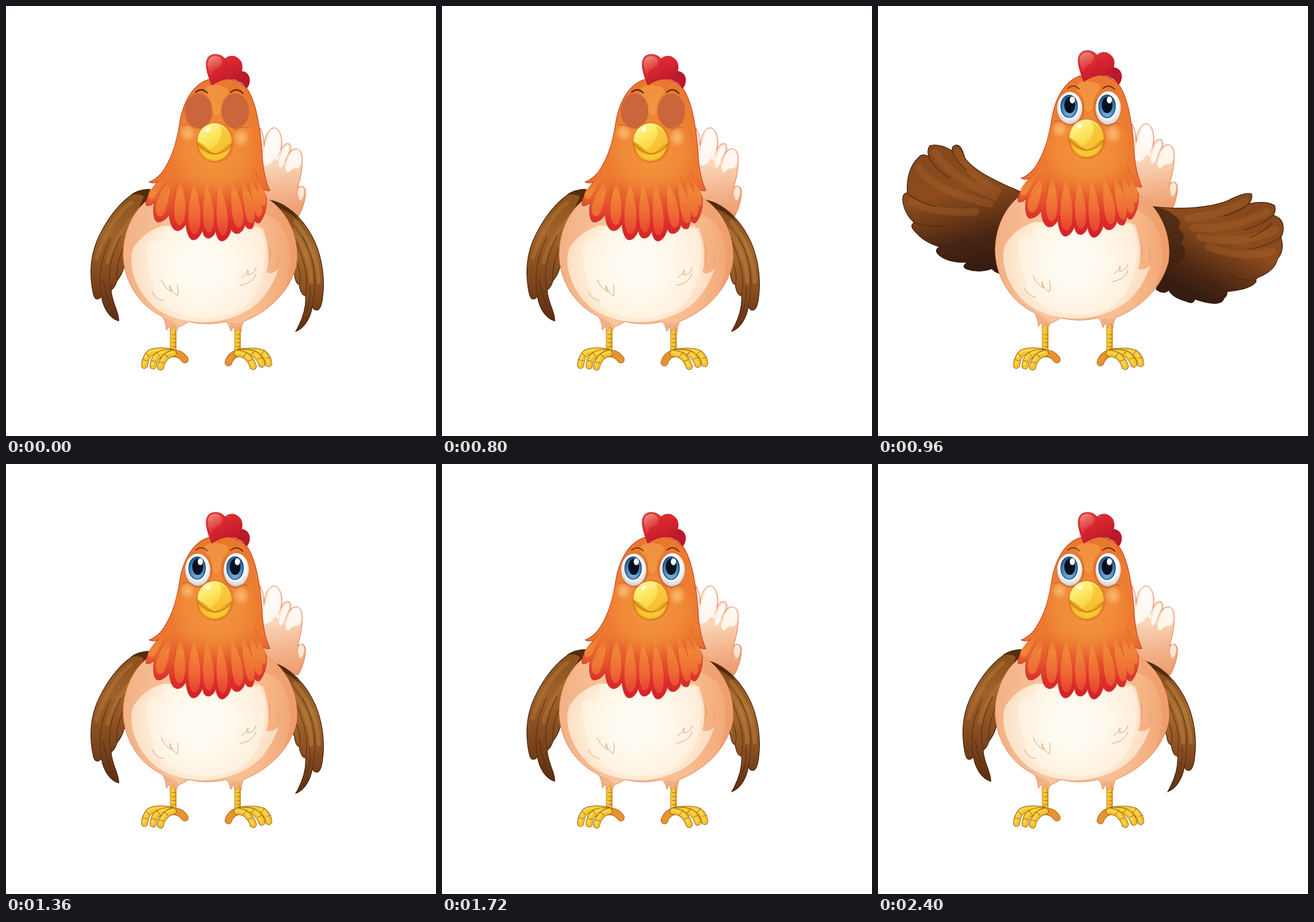
Write an HTML page that moves like this. It is 748 px wide and 748 px high and loops after 3.32 s.

```html
<!DOCTYPE html>
<html>
<head>
<meta charset="utf-8">
<title>Hen</title>
<style>
html, body { margin: 0; width: 100%; height: 100%; overflow: hidden; background: #fff; }
svg { display: block; width: 100vw; height: 100vh; }
.line { fill: none; stroke-linecap: round; stroke-linejoin: round; }
</style>
</head>
<body>
<svg viewBox="0 0 748 748">
<defs>
  <linearGradient id="headFill" gradientUnits="userSpaceOnUse" x1="0" y1="127" x2="0" y2="408">
    <stop offset="0" stop-color="#e9772d"/><stop offset=".25" stop-color="#ed7d31"/>
    <stop offset=".6" stop-color="#ec7a30"/><stop offset=".76" stop-color="#e6582d"/>
    <stop offset=".88" stop-color="#de302c"/><stop offset="1" stop-color="#d51f2b"/>
  </linearGradient>
  <radialGradient id="faceGlow" gradientUnits="userSpaceOnUse" cx="364" cy="255" r="85">
    <stop offset="0" stop-color="#f4963f"/><stop offset=".6" stop-color="#f18f3a" stop-opacity=".75"/>
    <stop offset="1" stop-color="#f08a35" stop-opacity="0"/>
  </radialGradient>
  <linearGradient id="petalFill" gradientUnits="userSpaceOnUse" x1="0" y1="295" x2="0" y2="396">
    <stop offset="0" stop-color="#f29239" stop-opacity="0"/><stop offset=".3" stop-color="#f18a38" stop-opacity=".9"/>
    <stop offset=".65" stop-color="#ee6b34"/><stop offset="1" stop-color="#e8422f"/>
  </linearGradient>
  <linearGradient id="bodyFill" gradientUnits="userSpaceOnUse" x1="203" y1="0" x2="508" y2="0">
    <stop offset="0" stop-color="#f3b084"/><stop offset=".3" stop-color="#f8c59c"/>
    <stop offset=".75" stop-color="#f8bd90"/><stop offset="1" stop-color="#f2a472"/>
  </linearGradient>
  <radialGradient id="bellyFill" gradientUnits="userSpaceOnUse" cx="340" cy="452" r="128">
    <stop offset="0" stop-color="#fffefa"/><stop offset=".35" stop-color="#fffaef"/>
    <stop offset=".7" stop-color="#feedd8"/><stop offset="1" stop-color="#fbdcbf"/>
  </radialGradient>
  <linearGradient id="tailFill" gradientUnits="userSpaceOnUse" x1="470" y1="212" x2="490" y2="367">
    <stop offset="0" stop-color="#fdf0e4"/><stop offset=".4" stop-color="#fad5b8"/>
    <stop offset=".7" stop-color="#f4b68e"/><stop offset="1" stop-color="#ec9a6c"/>
  </linearGradient>
  <linearGradient id="tipFill" gradientUnits="userSpaceOnUse" x1="0" y1="214" x2="0" y2="290">
    <stop offset="0" stop-color="#fffefc"/><stop offset="1" stop-color="#fff4e9"/>
  </linearGradient>
  <linearGradient id="combFill" x1="0" y1="0" x2=".6" y2="1">
    <stop offset="0" stop-color="#e64a44"/><stop offset=".5" stop-color="#d8252e"/>
    <stop offset="1" stop-color="#bb182b"/>
  </linearGradient>
  <linearGradient id="shine" x1="0" y1="0" x2=".3" y2="1">
    <stop offset="0" stop-color="#f2978a"/><stop offset="1" stop-color="#de403c" stop-opacity=".2"/>
  </linearGradient>
  <linearGradient id="foldL" gradientUnits="userSpaceOnUse" x1="195" y1="335" x2="190" y2="540">
    <stop offset="0" stop-color="#8d531c"/><stop offset=".3" stop-color="#a0622a"/>
    <stop offset=".65" stop-color="#834a1e"/><stop offset="1" stop-color="#613012"/>
  </linearGradient>
  <linearGradient id="foldR" gradientUnits="userSpaceOnUse" x1="480" y1="350" x2="525" y2="560">
    <stop offset="0" stop-color="#82491a"/><stop offset=".4" stop-color="#a2682c"/>
    <stop offset=".7" stop-color="#8b5021"/><stop offset="1" stop-color="#613012"/>
  </linearGradient>
  <linearGradient id="openL" gradientUnits="userSpaceOnUse" x1="120" y1="265" x2="172" y2="452">
    <stop offset="0" stop-color="#86481c"/><stop offset=".3" stop-color="#8c4c1d"/>
    <stop offset=".55" stop-color="#6b3817"/><stop offset=".75" stop-color="#4a2513"/><stop offset="1" stop-color="#361c11"/>
  </linearGradient>
  <linearGradient id="openR" gradientUnits="userSpaceOnUse" x1="625" y1="345" x2="545" y2="500">
    <stop offset="0" stop-color="#86481c"/><stop offset=".35" stop-color="#8c4c1d"/>
    <stop offset=".6" stop-color="#693717"/><stop offset=".8" stop-color="#4a2513"/><stop offset="1" stop-color="#361c11"/>
  </linearGradient>
  <linearGradient id="beakFill" x1=".15" y1="0" x2=".8" y2="1">
    <stop offset="0" stop-color="#fff6ab"/><stop offset=".4" stop-color="#fde863"/>
    <stop offset="1" stop-color="#f8c62c"/>
  </linearGradient>
  <radialGradient id="cheek">
    <stop offset="0" stop-color="#f9b873"/><stop offset=".6" stop-color="#f6a658" stop-opacity=".8"/>
    <stop offset="1" stop-color="#f29543" stop-opacity="0"/>
  </radialGradient>
  <radialGradient id="white" cx=".5" cy=".42" r=".6">
    <stop offset=".6" stop-color="#fff"/><stop offset="1" stop-color="#c3ccd6"/>
  </radialGradient>
  <radialGradient id="iris" cx=".5" cy=".75" r=".7">
    <stop offset="0" stop-color="#7cbde6"/><stop offset=".6" stop-color="#3f87be"/>
    <stop offset="1" stop-color="#235a94"/>
  </radialGradient>
  <linearGradient id="legFill" x1="0" y1="0" x2="1" y2="0">
    <stop offset="0" stop-color="#f6c22c"/><stop offset=".5" stop-color="#f9cf39"/><stop offset="1" stop-color="#d9921b"/>
  </linearGradient>
</defs>

<g id="tail">
  <path fill="url(#tailFill)" stroke="#e2724d" stroke-width="1" d="M442 212Q449 224 449 243C450 226 458 211 468 212C478 215 483 235 478 251C480 243 487 237 493 240C498 246 495 254 492 257C500 244 514 246 515 262C516 285 512 300 507 317C510 312 520 311 521 322C521 340 514 358 508 367L470 360L440 340Z"/>
  <g fill="url(#tipFill)">
    <path d="M447 256Q451 246 456 230Q460 213 469 214Q479 222 477 244Q478 262 473 270Q469 262 465 269Q458 280 447 277Z"/>
    <path d="M477 264Q483 243 491 243Q494 251 487 263Q484 277 477 282Q472 274 477 264Z"/>
    <path d="M487 277Q494 249 507 249Q515 255 514 270Q512 284 504 282Q498 281 491 290Q484 286 487 277Z"/>
    <path d="M508 328Q507 316 514 314Q520 317 518 327Q516 338 511 338Z" opacity=".8"/>
  </g>
  <path class="line" stroke="#eb9d79" stroke-width=".9" d="M478 251Q475 258 473 262M492 257Q488 263 486 269M507 317Q503 326 504 332"/>
</g>

<g id="folded">
  <path fill="url(#foldL)" stroke="#3d210e" stroke-width="1.2" d="M251 319C218 317 184 355 162 400C146 433 145 466 151 497Q153 509 158 510Q163 510 166 505C169 525 180 543 196 548C198 535 184 516 183 494Q190 489 193 478Q202 467 205 455L238 400Z"/>
  <path fill="#4e290d" opacity=".9" d="M251 319Q231 317 216 329Q232 325 240 332L231 351L250 341Z"/>
  <path class="line" stroke="#b97c3d" stroke-width="7" opacity=".4" d="M218 342C190 362 167 407 158 438M224 365C200 390 181 422 177 445"/>
  <path class="line" stroke="#4b260f" stroke-width="1.1" opacity=".8" d="M182 403C165 437 160 471 166 505M200 400C184 430 175 462 183 494M208 412C198 434 191 455 193 478M169 475Q172 499 182 520"/>
  <path fill="url(#foldR)" stroke="#3d210e" stroke-width="1.2" d="M453 337C487 340 520 371 538 412C550 440 555 475 551 505Q549 526 542 529Q535 530 533 522C530 542 520 560 504 566C513 550 523 527 521 504Q513 504 510 485Q503 482 502 468L475 400Z"/>
  <path fill="#4e290d" opacity=".9" d="M453 337Q475 338 492 353Q504 363 511 374Q494 360 478 352L485 369L458 349Z"/>
  <path class="line" stroke="#c48a45" stroke-width="7" opacity=".4" d="M503 375C528 405 544 446 544 480M500 390C520 418 530 451 531 480"/>
  <path class="line" stroke="#4b260f" stroke-width="1.1" opacity=".8" d="M515 400C537 437 542 475 533 522M504 410C521 445 527 475 521 504M505 445Q515 467 510 485M528 487Q532 510 522 534"/>
</g>

<g id="spread">
  <path fill="url(#openL)" stroke="#2c170c" stroke-width="1.1" d="M248 323C212 308 166 287 151 264Q145 240 135 242Q128 243 129 252Q108 238 90 243Q85 250 88 262Q77 255 70 264C56 277 49 300 51 325Q42 325 43 339Q46 362 63 377Q53 382 66 394Q80 411 107 419Q96 425 107 434Q123 447 156 446Q143 453 155 458Q176 465 198 457Q204 465 217 466L225 390Z"/>
  <g class="line" stroke="#a8632a" stroke-width="13" opacity=".38">
    <path d="M138 256Q158 294 208 322M100 256Q127 298 203 332M71 282Q98 322 194 344M58 341Q100 362 170 358"/>
  </g>
  <path class="line" stroke="#3b1e0d" stroke-width="1.2" opacity=".75" d="M129 252Q136 271 154 286M88 262Q99 284 125 300M51 325Q68 341 100 349M63 377Q88 386 120 382M107 419Q133 420 157 409M156 446Q178 442 192 432"/>
  <path fill="url(#openR)" stroke="#2c170c" stroke-width="1.1" d="M468 348C520 354 572 353 610 338Q638 323 650 327Q652 337 645 344Q674 338 690 347Q693 356 688 364Q704 369 705 384Q706 394 701 402Q708 425 695 440Q691 458 669 469Q654 474 658 479Q650 493 607 497Q608 504 602 508Q598 526 551 510Q549 520 537 514Q511 507 506 494Q497 503 484 493L490 400Z"/>
  <path fill="#3c1f11" opacity=".65" d="M468 348Q500 350 514 364Q530 371 523 387Q538 399 527 412Q540 428 530 440L500 470L490 400Z"/>
  <g class="line" stroke="#a8632a" stroke-width="13" opacity=".38">
    <path d="M638 340Q593 364 540 369M678 357Q616 390 548 386M692 389Q628 419 560 402M686 427Q633 442 575 419"/>
  </g>
  <path class="line" stroke="#3b1e0d" stroke-width="1.2" opacity=".75" d="M645 344Q626 359 600 366M688 364Q666 382 635 390M701 402Q676 419 645 423M658 479Q632 478 610 468M607 497Q584 492 566 478M551 510Q536 499 526 482M685 378Q668 395 647 403"/>
</g>

<g id="feet" stroke-linecap="round" stroke-linejoin="round"></g>

<g id="trunk">
  <path fill="url(#bodyFill)" stroke="#e28255" stroke-width="1" d="M250 335C219 356 202 398 204 438C207 484 235 523 272 540Q278 548 279 564L284 557L287 566L292 557L296 566L300 558Q307 556 318 549Q350 557 383 549Q389 555 391 566L396 558L400 567L405 558L409 567Q408 557 413 549C455 532 492 500 505 452C512 405 490 356 453 334Z"/>
  <path fill="#e98f5c" opacity=".4" d="M455 337C490 359 510 405 504 452C500 470 492 485 482 498C499 455 498 405 476 378Q465 368 446 360Z"/>
  <path fill="url(#bellyFill)" d="M274 382Q241 391 222 420C210 449 225 500 265 529C302 553 362 558 410 535C446 518 462 490 474 458Q459 469 453 463Q462 429 447 386Z"/>
  <path fill="#fffaf0" opacity=".4" d="M287 383Q270 393 270 411Q246 402 244 421Q245 463 259 484Q254 491 265 511C298 543 351 551 397 534C429 520 446 488 449 449Q457 416 440 382Z"/>
  <path class="line" stroke="#d99a70" stroke-width="1" d="M270 476Q275 490 288 497Q284 491 285 486Q289 499 298 504Q301 495 298 485M255 498Q259 509 274 513M435 455Q432 467 420 468Q422 463 421 459Q417 469 410 472M435 466Q430 482 408 486M457 417Q463 431 457 445M471 428Q477 441 472 454M459 449Q461 452 465 453"/>
  <path fill="#eea177" d="M273 541Q278 550 279 564L284 557L287 566L292 557L296 566L300 558Q294 548 273 541M413 550Q401 553 389 550L391 566L396 558L400 567L405 558L409 567Z" opacity=".5"/>

  <path fill="url(#headFill)" stroke="#c83d2b" stroke-width="1.2" d="M355 127C330 133 309 160 302 204C297 240 287 268 271 290Q261 302 249 306Q257 310 264 306C250 322 242 338 244 347Q251 349 258 341C255 358 257 374 264 376Q275 376 284 363C285 379 290 391 299 391Q307 390 313 379C314 394 319 407 326 407Q335 406 342 390C343 400 347 404 353 404Q361 402 365 391C366 401 370 409 376 409Q387 406 392 388C395 395 400 397 406 395Q414 390 416 379C418 387 422 389 428 387Q432 380 432 372Q436 379 441 377C450 367 454 350 453 334L447 318Q453 323 459 321Q449 300 446 265C443 215 436 165 418 142Q395 120 355 127Z"/>
  <ellipse cx="364" cy="255" rx="72" ry="85" fill="url(#faceGlow)"/>
  <g id="petals" fill="url(#petalFill)"></g>
  <path class="line" stroke="#d64a2a" stroke-width="1" opacity=".65" d="M264 306Q275 296 280 286M287 303Q281 329 258 341M295 315Q296 336 284 363M434 286Q439 307 447 318"/>
  <path fill="#f6a34b" d="M351 139Q365 135 381 141Q392 146 382 157Q374 167 373 184Q366 196 359 184Q360 166 350 157Q340 149 351 139Z" opacity=".6"/>
  <ellipse cx="364" cy="237" rx="33" ry="36" fill="#e5742a" opacity=".6"/>

  <g id="shut" fill="#cb653b">
    <ellipse cx="335" cy="183" rx="24" ry="30.5"/>
    <ellipse cx="399" cy="183" rx="24" ry="30.5"/>
    <path fill="#ee8737" d="M303 206Q320 202 332 215L326 224L305 222ZM397 215Q411 205 424 211L424 221L398 224Z"/>
  </g>
  <g id="open">
    <ellipse cx="335" cy="186" rx="24" ry="29" fill="#d4652a" opacity=".7"/>
    <ellipse cx="399" cy="186" rx="24" ry="30" fill="#d4652a" opacity=".7"/>
    <ellipse cx="333.5" cy="184" rx="22" ry="28" fill="url(#white)"/>
    <ellipse cx="400.5" cy="184" rx="22" ry="29" fill="url(#white)"/>
    <g stroke="#17365b" stroke-width="1.2" fill="url(#iris)">
      <ellipse cx="332.5" cy="181" rx="14.5" ry="19.5"/>
      <ellipse cx="398.5" cy="181" rx="14.5" ry="20"/>
    </g>
    <ellipse cx="333.5" cy="179" rx="9.5" ry="14" fill="#07101d"/>
    <ellipse cx="398.5" cy="179" rx="9.5" ry="14" fill="#07101d"/>
    <g fill="#fff">
      <ellipse cx="338" cy="170" rx="4.500" ry="6"/><ellipse cx="402.500" cy="170" rx="4.500" ry="6"/>
    </g>
  </g>
  <ellipse cx="316" cy="221" rx="15" ry="16" fill="url(#cheek)"/>
  <ellipse cx="409" cy="229" rx="16" ry="18" fill="url(#cheek)"/>
  <path class="line" stroke="#cf5d2a" stroke-width="1.2" d="M306 208Q315 203 326 211M398 216Q410 208 422 212"/>
  <path id="brows" class="line" stroke="#4a2510" d="M330 150Q340 141 350 151M391 150Q402 141 412 152"/>

  <path fill="#f0a822" stroke="#c9711a" stroke-width="1" d="M333 235Q334 268 362 271Q390 269 393 237Z"/>
  <path fill="#f8c735" d="M338 250Q362 268 389 249Q382 267 363 268Q345 267 338 250Z"/>
  <path fill="url(#beakFill)" stroke="#d8921d" stroke-width=".9" d="M333 236C332 220 344 204 363 203.500C382 204 393 222 393 238Q384 242 375 251Q364 262 353 251Q345 242 333 236Z"/>
  <path fill="#f6b92a" opacity=".6" d="M392 237Q384 242 375 251Q364 261 354 251Q371 240 374 226Q376 217 372 208Q391 218 392 237Z"/>
  <path class="line" stroke="#b5661a" stroke-width="1.1" d="M334 240Q348 255 363 257.500Q379 256 392 241"/>
  <ellipse cx="351" cy="215" rx="5" ry="3.500" fill="#fffef0" opacity=".8" transform="rotate(-32 351 215)"/>

  <path fill="#b9192a" d="M407 113Q421 113 424 126Q425 138 418 144Q413 133 401 130Z"/>
  <path fill="url(#combFill)" stroke="#b51c2a" stroke-width=".8" d="M358 138C351 121 346 104 349 95Q352 84 364 84Q375 84 381 92Q388 85 399 88Q411 94 411 106Q411 114 407 118Q417 123 417 137Q390 116 358 138Z"/>
  <path fill="url(#shine)" d="M352 108Q348 89 363 87Q371 87 375 93Q378 104 366 109Q357 113 357 126Z"/>
  <path class="line" stroke="#b61a2a" stroke-width="1.2" d="M381 92Q385 99 381 104M407 118Q401 120 396 119"/>
</g>
</svg>

<script>
const byId = id => document.getElementById(id);
const LOOP = 3320;

// Ruff feathers: root x, root y, tip x, tip y, half width
const petals = [
  [278, 296, 253, 336, 8], [288, 300, 268, 366, 10], [304, 302, 302, 381, 10],
  [327, 306, 328, 397, 11], [349, 308, 353, 394, 10], [371, 308, 377, 399, 10],
  [392, 304, 405, 386, 10], [410, 300, 426, 378, 9], [423, 298, 440, 367, 8],
  [435, 294, 448, 348, 6]
];
byId("petals").innerHTML = petals.map(([x, y, tx, ty, w]) => {
  const my = y + (ty - y) * .6;
  return `<path d="M${x} ${y}C${tx - w * 1.5} ${my} ${tx - w} ${ty} ${tx} ${ty}C${tx + w} ${ty} ${tx + w * 1.5} ${my} ${x} ${y}Z"/>`;
}).join("");

const line = (d, color, w) => `<path d="${d}" fill="none" stroke="${color}" stroke-width="${w}"/>`;
const toe = (d, color = "#f6c12c") =>
  line(d, "#795018", 12) + line(d, color, 10.4) +
  `<g transform="translate(-1.2 -1.5)">${line(d, "#fbd64d", 3.5)}</g>`;
const backToe = d => line(d, "#8a4f18", 13) + line(d, "#e8932d", 11.5);

function leg(x) {
  let s = `<rect x="${x - 5}" y="545" width="10" height="57" fill="url(#legFill)" stroke="#b87917" stroke-width=".8"/>`;
  for (let y = 571; y < 598; y += 7) s += line(`M${x - 3} ${y}Q${x + 1} ${y + 2} ${x + 5} ${y}`, "#a96b16", 1);
  return s;
}

byId("feet").innerHTML =
  backToe("M290 604Q304 604 311 615") +
  leg(291) +
  toe("M288 602Q262 597 250 604Q242 612 241 625") +
  toe("M288 603Q269 602 261 611Q257 617 256 626") +
  toe("M291 604Q280 606 275 614Q270 620 269 628") +
  line("M237 615L246 617M243 603L249 610M253 616L261 619M262 602L267 609M266 619L275 621M275 605L282 611", "#a96b16", 1.1) +
  backToe("M404 604Q391 607 387 620") +
  leg(403) +
  toe("M406 602Q434 598 447 604Q456 611 457 622") +
  toe("M406 603Q429 601 437 609Q443 615 445 623") +
  toe("M402 604Q417 605 423 614Q428 620 430 627") +
  line("M453 613L461 611M443 607L449 600M438 614L446 611M426 607L432 601M421 618L429 615M412 611L418 604", "#a96b16", 1.1);

// start time, eyes shut, wing drop, wings spread
const poses = [
  [0, 1, 0, 0], [80, 0, 0, 0], [200, 1, 0, 0], [280, 0, 0, 0],
  [800, 1, 0, 0], [880, 0, 0, 0], [960, 0, 0, 1],
  [1360, 0, 7, 0], [1600, 1, 7, 0], [1680, 0, 6, 0], [1720, 0, 4, 0],
  [2320, 1, 4, 0], [2400, 0, 4, 0]
];

const show = (id, on) => byId(id).setAttribute("display", on ? "inline" : "none");
const shift = (id, y) => byId(id).setAttribute("transform", `translate(0 ${y})`);

function draw(ms) {
  const t = ms % LOOP;
  const [, shut, drop, spread] = poses.filter(p => p[0] <= t).pop();
  show("shut", shut);
  show("open", !shut);
  show("folded", !spread);
  show("spread", spread);
  shift("folded", drop);
  shift("trunk", spread ? -6.5 : 0);
  shift("tail", spread ? -7 : 0);
  byId("brows").setAttribute("stroke-width", shut ? 2.2 : 1.6);
}

const start = performance.now();
function tick() {
  draw(performance.now() - start);
  requestAnimationFrame(tick);
}
tick();
</script>
</body>
</html>
```
